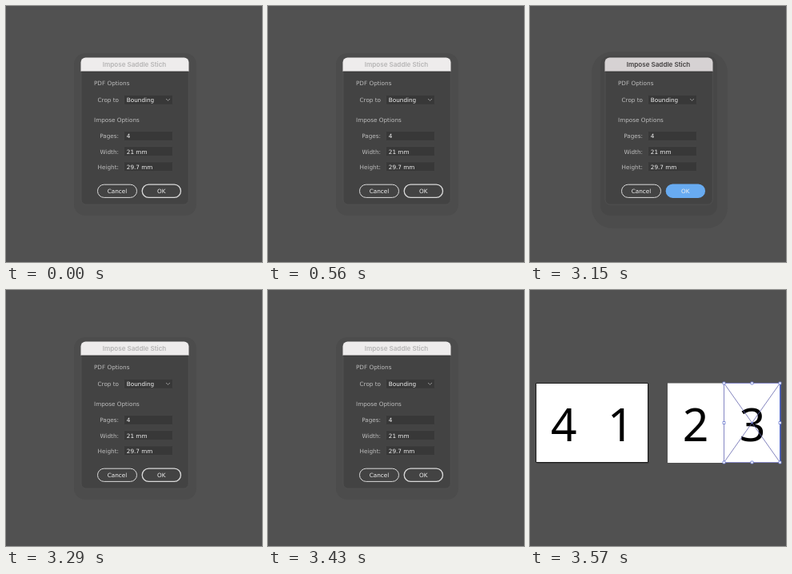
An HTML page with a canvas for the animation above (5180 ms loop, 320 px wide and 320 px high).

```html
<!DOCTYPE html>
<html lang="en">
<head>
<meta charset="utf-8">
<title>Impose dialog</title>
<style>
  html, body { margin: 0; width: 100%; height: 100%; overflow: hidden; background: #515151; }
  canvas { display: block; width: 100vw; height: 100vh; }
</style>
</head>
<body>
<canvas id="stage" width="320" height="320"></canvas>
<script>
const ctx = document.getElementById('stage').getContext('2d');
const LOOP = 5180;
const LABEL_FONT = '7.25px "DejaVu Sans", sans-serif';
const TITLE_FONT = '600 8.1px Inter, sans-serif';
const PAGE_FONT = '57px "Noto Sans", sans-serif';

function box(x, y, w, h, radius, fill, stroke, lineWidth = 1) {
  ctx.beginPath();
  ctx.roundRect(x, y, w, h, radius);
  if (fill) {
    ctx.fillStyle = fill;
    ctx.fill();
  }
  if (stroke) {
    ctx.strokeStyle = stroke;
    ctx.lineWidth = lineWidth;
    ctx.stroke();
  }
}

function text(str, x, y, color, align = 'left', font = LABEL_FONT) {
  ctx.font = font;
  ctx.textAlign = align;
  ctx.fillStyle = color;
  ctx.fillText(str, x, y);
}

function line(color, width, ...points) {
  ctx.beginPath();
  points.forEach(([x, y]) => ctx.lineTo(x, y));
  ctx.strokeStyle = color;
  ctx.lineWidth = width;
  ctx.stroke();
}

function artboards() {
  box(8.5, 117.5, 140, 99, 0, '#333');
  box(7.5, 116.5, 140, 99, 0, '#fff', '#1c1c1c');
  box(172, 116.5, 140.5, 99.5, 0, '#fff');
}

function pages() {
  [['4', 42.3], ['1', 113.2], ['2', 207], ['3', 278]].forEach(([digit, x]) =>
    text(digit, x, 188.5, '#000', 'center', PAGE_FONT));
}

function selection() {
  const xs = [242.5, 277.5, 312.5], ys = [116.5, 166, 215.5];
  const [left, midX, right] = xs, [top, midY, bottom] = ys;
  const color = '#6264ad';
  line(color, 0.8, [left, top], [right, bottom]);
  line(color, 0.8, [right, top], [left, bottom]);
  box(left, top, right - left, bottom - top, 0, null, '#8587c4');
  line('#4a61c9', 1.6, [right + 0.3, top], [right + 0.3, bottom]);
  for (const x of xs) {
    for (const y of ys) {
      if (x === midX && y === midY) continue;
      box(x - 1.5, y - 1.5, 3, 3, 0, '#fff', '#6f7ed2', 0.8);
    }
  }
  box(midX - 1, midY - 1, 2, 2, 0, '#6f7ed2');
}

function field(label, value, y, focused) {
  text(label, 141, y + 2.8, '#bdbdbd', 'right');
  if (focused) {
    box(147.2, y - 6.3, 61.4, 12.6, 1, '#fff', '#86b4e8', 0.6);
    box(150, y - 4.7, 5.5, 9.4, 0, '#bcd6f5');
  } else {
    box(147.5, y - 6, 61, 12, 1, '#383838', '#484848', 0.8);
  }
  text(value, 150.8, y + 2.8, focused ? '#3b4654' : '#f2f2f2');
}

function button(label, x, w, { fill, color = '#f0f0f0', edge = 1 }) {
  if (fill) box(x - 0.5, 222.5, w + 1, 17.4, 8.7, fill);
  else box(x, 223.2, w, 16.2, 8.1, null, '#d9d9d9', edge);
  text(label, x + w / 2, 234, color, 'center');
}

function dialog({ active, focused, okFill, okText }) {
  const shade = 'rgba(0,0,0,.065)';
  if (active) {
    box(77, 57, 170, 221, 26, shade);
    box(88, 62, 146, 200, 12, shade);
  } else {
    box(85, 59, 153, 203, 14, shade);
  }
  box(94, 65, 134.2, 183.2, 6, '#434343', '#555', 0.8);
  box(93.5, 64.5, 135, 17.3, [6, 6, 0, 0], active ? '#d6d2d3' : '#eeecec');
  line('#353535', 0.8, [94, 82.2], [228, 82.2]);
  text('Impose Saddle Stich', 160.5, 75.8, active ? '#434041' : '#b6b5b5', 'center', TITLE_FONT);

  text('PDF Options', 110, 99.3, '#bdbdbd');
  field('Crop to', 'Bounding', 117.3, false);
  line('#aaa', 0.8, [200, 116], [202.5, 118.3], [205, 116]);
  text('Impose Options', 110, 144.8, '#bdbdbd');
  field('Pages:', '4', 162.5, focused);
  field('Width:', '21 mm', 181.7, false);
  field('Height:', '29.7 mm', 200.8, false);

  button('Cancel', 114.5, 49, {});
  button('OK', 170.2, 48.3, { fill: okFill, color: okText, edge: 1.3 });
}

function draw(t) {
  box(0, 0, 320, 320, 0, '#515151');
  if (t >= 3500) artboards();
  if (t >= 3570) {
    pages();
    selection();
  } else if (t >= 3500) {
    dialog({ okFill: '#cecece', okText: '#707070' });
  } else if (t >= 3150 && t < 3290) {
    dialog({ active: true, okFill: '#68abf1' });
  } else if (t >= 1190 && t < 3150) {
    dialog({ active: true, focused: true });
  } else {
    dialog({});
  }
}

const start = performance.now();
function tick() {
  draw((performance.now() - start) % LOOP);
  requestAnimationFrame(tick);
}
tick();
</script>
</body>
</html>
```
